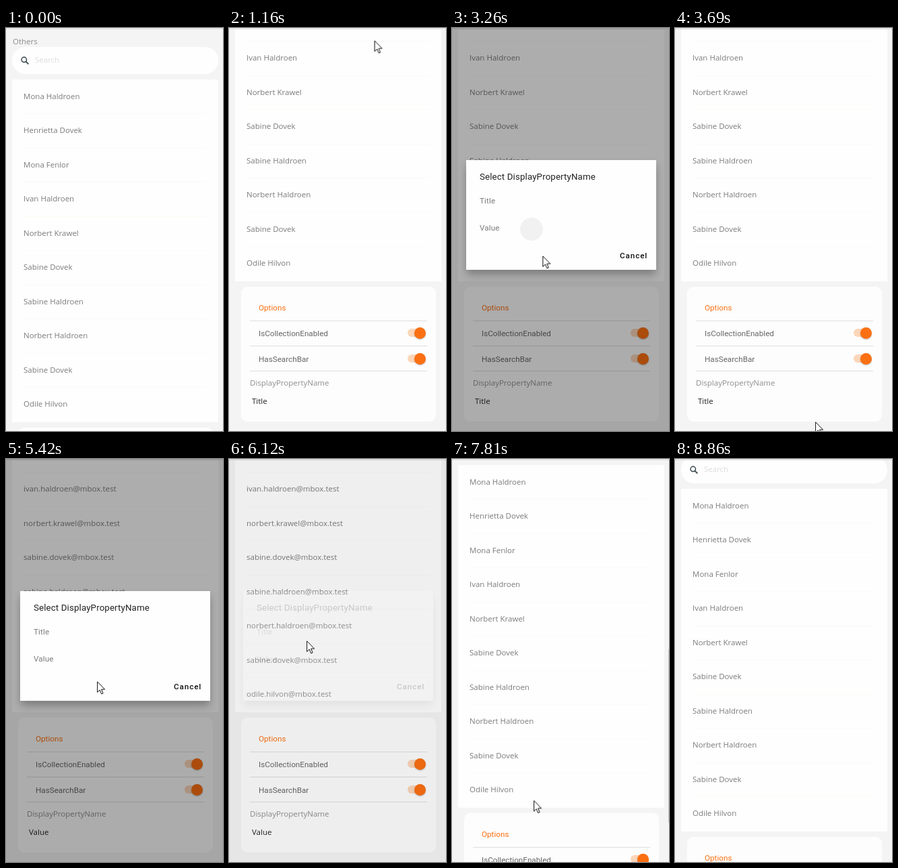
An HTML page that plays this animation: 322 px wide and 595 px high, repeating every 9340 ms.

```html
<!DOCTYPE html>
<html lang="en">
<head>
<meta charset="utf-8">
<title>List options</title>
<style>
@property --s { syntax: "<number>"; inherits: true; initial-value: 0; }
html, body { margin: 0; width: 100%; height: 100%; overflow: hidden; background: #f4f4f4; }
#stage {
  position: relative; width: 322px; height: 595px; overflow: hidden;
  background: #f4f4f4; color: #7c7c7c;
  font: 11.5px/20px "Open Sans", sans-serif; white-space: nowrap;
  animation: scroll 9340ms infinite;
}
#stage *, #stage *::before { position: absolute; box-sizing: border-box; }
.rob { font-family: Roboto, sans-serif; font-size: 11.7px; }

#page { inset: 0; transform: translateY(calc(var(--s) * -1px)); }
#search { left: 9px; top: 28px; width: 306px; height: 40px; border-radius: 20px; background: #fefefe; }
#search span { left: 34px; top: 9px; color: #dcdcdc; }
#search svg { left: 13px; top: 14px; }
#list { left: 9px; top: 76px; width: 306px; height: 506px; background: #fefefe; }
.row { left: 17px; width: 271px; height: 50px; line-height: 50px; }
.row + .row { box-shadow: inset 0 1px #fcf9f5; }
.row span, #choice span { left: 0; top: 0; }

#card { left: 18px; top: 590px; width: 289px; height: 199px; border-radius: 9px; background: #fdfdfd; }
#card .rule { left: 13px; width: 263px; height: 1px; background: #dedede; }
#choice { left: 16px; top: 159px; color: #222; }
.switch { left: 247px; width: 24px; height: 12px; border-radius: 6px; background: #fcd6b9; }
.switch::before {
  content: ""; left: 10px; top: -2.5px; width: 17px; height: 17px; border-radius: 50%;
  background: #fb7012; box-shadow: 0 1px 2px #0004;
}
#bar { left: 273px; top: 12px; width: 3px; height: 174px; background: #ababab; animation: bar 9340ms infinite; }

#topline { left: 0; top: 0; width: 322px; height: 2px; background: linear-gradient(#efefef 50%, #dedede 50%); }
#thumb {
  left: 321px; top: 253px; width: 1px; height: 256px; background: #c4c4c4;
  transform: translateY(calc(var(--s) * .413px)); animation: thumb 9340ms infinite;
}

.name { animation: name 9340ms step-end infinite; }
.value { animation: value 9340ms step-end infinite; }

#dim { inset: 0; background: rgba(0,0,0,.32); animation: dim 9340ms infinite; }
#dialog {
  left: 21px; top: 195px; width: 282px; height: 162px; background: #fefefe;
  box-shadow: 0 9px 12px -1px rgba(0,0,0,.2), 0 4px 10px rgba(0,0,0,.1);
  animation: dialog 9340ms infinite;
}
#dialog h1 { margin: 0; left: 20px; top: 15px; font-size: 13.3px; font-weight: 400; letter-spacing: .13px; color: #222; }
#dialog b { left: 228px; top: 131px; font-weight: 500; letter-spacing: .9px; color: #111; }
.opt { left: 0; width: 282px; height: 40px; overflow: hidden; line-height: 40px; }
.opt span { left: 20px; letter-spacing: .1px; }
.opt i { width: 34px; height: 34px; border-radius: 50%; background: #f1f1f1; }
#tapTitle { left: 77px; top: 16px; animation: tapTitle 9340ms infinite; }
#tapValue { left: 80px; top: 5px; animation: tapValue 9340ms infinite; }
#cursor { left: 0; top: 0; animation: cursor 9340ms ease-in-out infinite; }

@keyframes scroll {
  0%, 4.497% { --s: 0; animation-timing-function: cubic-bezier(.3,.2,.3,1); }
  8.779%, 79.229% { --s: 208; animation-timing-function: cubic-bezier(.2,.6,.3,1); }
  90.792%, 100% { --s: 32; }
}
@keyframes thumb {
  0%, 4.4% { opacity: 0; }
  4.5%, 10.707% { opacity: 1; }
  12.848%, 79.2% { opacity: 0; }
  79.23%, 93.4% { opacity: 1; }
  94.861%, 100% { opacity: 0; }
}
@keyframes bar {
  0%, 44.003% { opacity: 0; }
  44.004%, 47.537% { opacity: 1; }
  49.786%, 74.196% { opacity: 0; }
  74.197%, 78.587% { opacity: 1; }
  81.37%, 100% { opacity: 0; }
}
@keyframes name { 0% { opacity: 1; } 44.004% { opacity: 0; } 74.197%, 100% { opacity: 1; } }
@keyframes value { 0% { opacity: 0; } 44.004% { opacity: 1; } 74.197%, 100% { opacity: 0; } }
@keyframes dim {
  0%, 24.517% { opacity: 0; }
  24.518% { opacity: .25; }
  26.66%, 34.95% { opacity: 1; }
  36.938%, 51.926% { opacity: 0; }
  51.927% { opacity: .25; }
  54.07%, 64.4% { opacity: 1; }
  66.595%, 100% { opacity: 0; }
}
@keyframes dialog {
  0%, 24.517% { opacity: 0; }
  24.518% { opacity: .43; }
  26.124%, 34.95% { opacity: 1; }
  36.938%, 51.926% { opacity: 0; }
  51.927% { opacity: .43; }
  53.533%, 64.4% { opacity: 1; }
  66.595%, 100% { opacity: 0; }
}
@keyframes tapValue {
  0%, 33.939% { opacity: 0; transform: scale(.5); }
  33.94% { opacity: 1; transform: scale(.5); }
  34.904% { opacity: 1; transform: none; }
  36.938%, 100% { opacity: 0; transform: scale(1.6); }
}
@keyframes tapTitle {
  0%, 64.56% { opacity: 0; transform: scale(.5); }
  64.561% { opacity: 1; transform: scale(.5); }
  66.595%, 100% { opacity: 0; transform: scale(1.6); }
}
@keyframes cursor {
  0%, 2.891% { transform: translate(330px, 430px); }
  4.497% { transform: translate(235px, 410px); }
  8.351% { transform: translate(222px, 70px); }
  13.383% { transform: translate(215px, 14px); }
  21.949%, 26.124% { transform: translate(53px, 547px); }
  31.906%, 33.94% { transform: translate(118px, 297px); animation-timing-function: ease-in; }
  34.904% { transform: translate(134px, 335px); animation-timing-function: ease-out; }
  39.507%, 47.537% { transform: translate(208px, 581px); }
  51.927%, 52.998% { transform: translate(54px, 548px); }
  57.495% { transform: translate(140px, 344px); }
  58.03% { transform: translate(135px, 328px); }
  60.493% { transform: translate(115px, 259px); }
  61.563%, 78.587% { transform: translate(115px, 268px); }
  81.9% { transform: translate(118px, 430px); }
  85.653%, 100% { transform: translate(125px, 600px); }
}
</style>
</head>
<body>
<div id="stage">
  <div id="page">
    <span style="left:10px;top:10px;color:#8c8c8c">Others</span>
    <div id="search">
      <svg width="13" height="13" fill="none" stroke="#37474a" stroke-width="1.5"><circle cx="4.8" cy="4.8" r="3.7"/><path d="M7.6 7.6L11.4 11.4" stroke-width="1.8"/></svg>
      <span>Search</span>
    </div>
    <div id="list"></div>
    <div id="card">
      <span class="rob" style="left:26px;top:21px;color:#fb7012">Options</span>
      <div class="rule" style="top:50px"></div>
      <span class="rob" style="left:26px;top:59px;color:#666">IsCollectionEnabled</span>
      <div class="switch" style="top:62px"></div>
      <div class="rule" style="top:87px"></div>
      <span class="rob" style="left:26px;top:97px;color:#666">HasSearchBar</span>
      <div class="switch" style="top:100px"></div>
      <div class="rule" style="top:124px"></div>
      <span style="left:13px;top:132px;color:#8e8e8e">DisplayPropertyName</span>
      <div id="choice"><span class="name">Title</span><span class="value">Value</span></div>
      <div id="bar"></div>
    </div>
  </div>
  <div id="topline"></div>
  <div id="thumb"></div>
  <div id="dim"></div>
  <div id="dialog" class="rob">
    <h1>Select DisplayPropertyName</h1>
    <div class="opt" style="top:40px"><i id="tapTitle"></i><span>Title</span></div>
    <div class="opt" style="top:80px"><i id="tapValue"></i><span>Value</span></div>
    <b>Cancel</b>
  </div>
  <svg id="cursor" width="14" height="21" fill="#fff" stroke="#111" stroke-linejoin="round"><path d="M.6.8V16.4L4.2 13L6.7 18.9L9.1 17.9L6.6 12.1H11.6Z"/></svg>
</div>
<script>
const people = ["Mona Haldroen", "Henrietta Dovek", "Mona Fenlor", "Ivan Haldroen", "Norbert Krawel",
  "Sabine Dovek", "Sabine Haldroen", "Norbert Haldroen", "Sabine Dovek", "Odile Hilvon"];
const mail = name => name.toLowerCase().replace(" ", ".") + "@mbox.test";
document.getElementById("list").innerHTML = people.map((name, i) =>
  `<div class="row" style="top:${Math.floor(i * 50.5)}px"><span class="name">${name}</span><span class="value">${mail(name)}</span></div>`
).join("");
</script>
</body>
</html>
```
